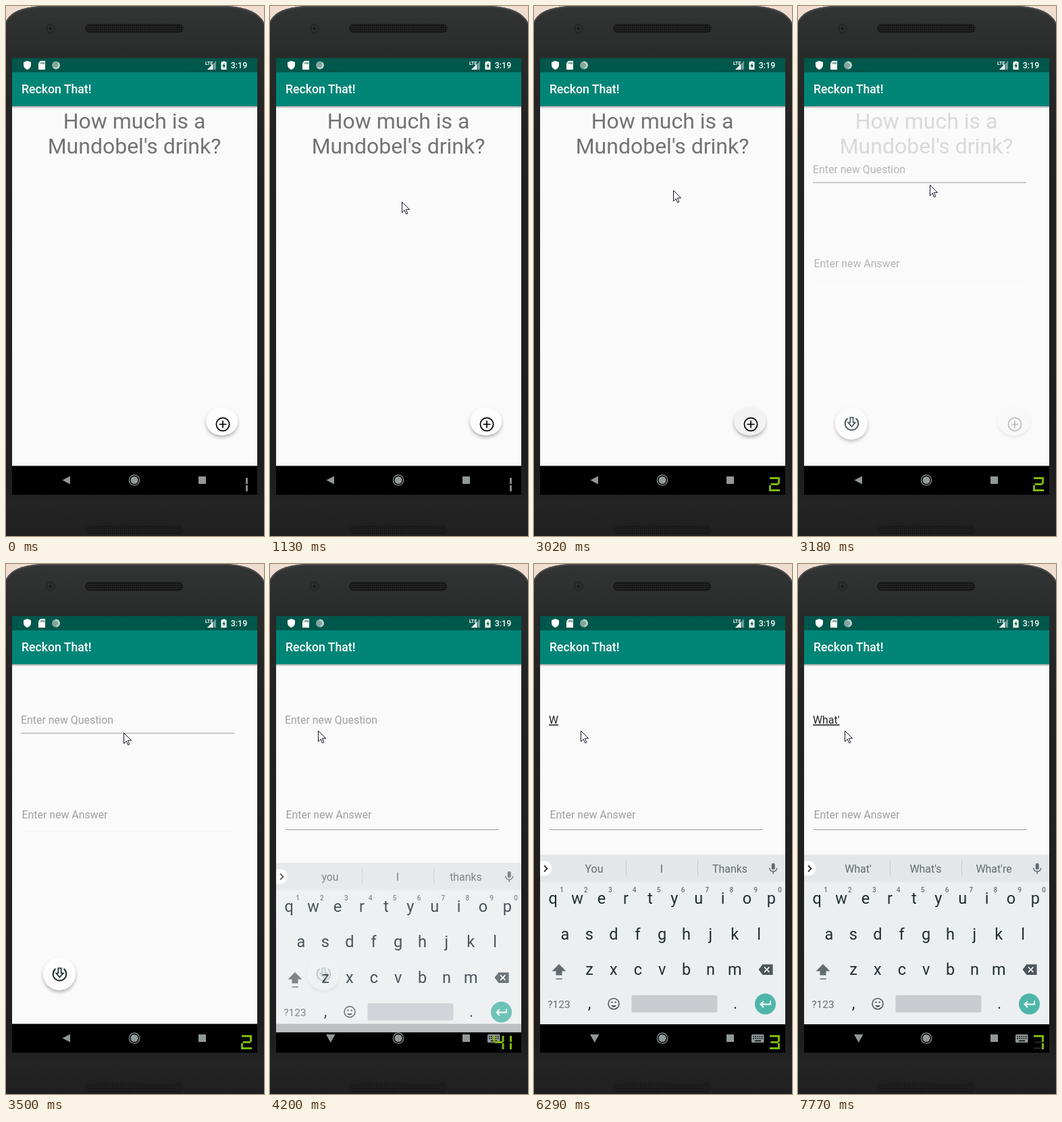
Recreate the animation shown at these times as an HTML page. Size 382 px wide and 783 px high, loop 8000 ms.

```html
<!DOCTYPE html>
<html lang="en">
<head>
<meta charset="utf-8">
<title>Phone quiz demo</title>
<style>
html, body { margin: 0; width: 100%; height: 100%; overflow: hidden; background: #f1ddd0; }
svg { display: block; width: 100%; height: 100%; }
text { font-family: Roboto, sans-serif; white-space: pre; }
.mid { text-anchor: middle; }
.title { font-size: 17.66px; font-weight: 500; fill: #fff; }
.ask { font-size: 32px; fill: #737373; }
.body { font-size: 15.9px; }
.key { font-size: 23.5px; fill: #1f2d33; }
.num { font-size: 10px; font-weight: 500; fill: #667075; }
</style>
</head>
<body>
<svg id="stage" viewBox="0 0 382 783" preserveAspectRatio="none">
  <defs>
    <linearGradient id="shell" x1="0" y1="0" x2="0" y2="1">
      <stop offset="0" stop-color="#333434"/><stop offset=".1" stop-color="#292a2a"/>
      <stop offset=".25" stop-color="#222222"/><stop offset=".9" stop-color="#1e1e1e"/>
      <stop offset=".94" stop-color="#242424"/><stop offset="1" stop-color="#1f1f1f"/>
    </linearGradient>
    <linearGradient id="drop" x1="0" y1="0" x2="0" y2="1">
      <stop offset="0" stop-color="#000" stop-opacity=".35"/><stop offset="1" stop-color="#000" stop-opacity="0"/>
    </linearGradient>
    <pattern id="mesh" width="3" height="3" patternUnits="userSpaceOnUse">
      <rect width="3" height="3" fill="#272727"/><circle cx="1.5" cy="1.5" r="1.1" fill="#090909"/>
    </pattern>
    <filter id="lift" x="-40%" y="-40%" width="180%" height="190%">
      <feDropShadow dx="0" dy="3" stdDeviation="2.6" flood-opacity=".3"/>
    </filter>
    <clipPath id="screen"><rect x="9" y="77" width="363" height="645"/></clipPath>
  </defs>

  <rect width="382" height="783" fill="#f1ddd0"/>
  <path d="M0 783V23C7 9 22 2 52 0H328C356 2 374 9 382 25V783Z" fill="url(#shell)"/>
  <path d="M0 24C7 10 22 3 52 1H328C356 3 374 10 382 26" fill="none" stroke="#484a4a" stroke-width="2"/>
  <rect x="117.500" y="27" width="144.500" height="12.500" rx="6" fill="url(#mesh)" stroke="#1b1b1b"/>
  <rect x="117.500" y="767" width="144.500" height="12.500" rx="6" fill="url(#mesh)" stroke="#1b1b1b"/>
  <circle cx="66" cy="33" r="7.500" fill="#262727"/>
  <circle cx="66" cy="33" r="4.500" fill="#303232"/>
  <circle cx="66" cy="33" r="2.200" fill="#1a1b1b"/>

  <g clip-path="url(#screen)">
    <rect x="9" y="77" width="363" height="645" fill="#fafafa"/>
    <g id="home">
      <text class="ask mid" x="190" y="181">How much is a</text>
      <text class="ask mid" x="190" y="218">Mundobel's drink?</text>
      <ellipse id="addFab" cx="319.700" cy="613.500" rx="23.500" ry="20.700" filter="url(#lift)"/>
      <g fill="none" stroke="#000" stroke-width="1.700">
        <circle cx="321" cy="618" r="9.600"/><path d="M315.500 618H326.500M321 612.500V623.500"/>
      </g>
    </g>

    <g id="form">
      <rect x="9" y="147" width="363" height="600" fill="#fafafa"/>
      <path d="M22 248.500H338M23.500 395.500H338" stroke="#f5f5f5"/>
      <path id="askLine" d="M22 250H338" stroke="#9b9b9b" stroke-width="1.200"/>
      <path id="replyLine" d="M23.500 392.500H338.500" stroke="#9b9b9b" stroke-width="1.200"/>
      <text id="entry" class="body" x="22" y="236"></text>
      <text class="body" x="23.500" y="375.500" fill="#a0a0a0">Enter new Answer</text>
      <circle cx="79" cy="605.500" r="24" fill="#fdfdfd" filter="url(#lift)"/>
      <g fill="none" stroke="#1a2b2e" stroke-width="2">
        <path d="M73.500 598A9.800 9.800 0 1 0 85.500 598"/>
        <path d="M77.300 597H81.700V604.500H84.800L79.500 610.500L74.200 604.500H77.300Z" stroke-width="1.700"/>
      </g>
    </g>

    <rect x="9" y="148" width="363" height="3.500" fill="url(#drop)"/>
    <rect x="9" y="77" width="363" height="21" fill="#00574b"/>
    <rect x="9" y="98" width="363" height="50" fill="#008577"/>
    <text class="title" x="23" y="129">Reckon That!</text>

    <g fill="#fff">
      <path d="M31.500 81L37 83V87C37 90.500 34.500 93 31.500 94C28.500 93 26 90.500 26 87V83Z"/>
      <path d="M51 81H58V94H48V84.500Z"/>
      <path d="M52 83V86M54.200 83V86M56.400 83V86" stroke="#00574b"/>
      <circle cx="74" cy="87.500" r="6" fill="#7fa69f"/>
      <circle id="spin" cx="74" cy="87.500" r="4.500" fill="none" stroke="#c3d3cf" stroke-width="2.500" stroke-dasharray="14 14.300"/>
      <text x="295" y="86.500" font-size="7" font-weight="700">LTE</text>
      <path d="M311 81V94H298Z" opacity=".4"/><path d="M306 86V94H298Z"/>
      <path d="M321 81.500H324V82.500H326.500V94H318.500V82.500H321Z"/>
      <path d="M323.300 84L320.300 89H322.200V92.500L325 87.500H323.300Z" fill="#00574b"/>
      <text x="332.800" y="92.300" font-size="12.400" font-weight="500">3:19</text>
    </g>

    <rect x="9" y="679.400" width="363" height="43" fill="#000"/>
    <g fill="#919999">
      <path id="back"/>
      <circle cx="190" cy="700.500" r="7.700" fill="none" stroke="#919999" stroke-width="1.200"/>
      <circle cx="190" cy="700.500" r="5.600"/>
      <rect x="285" y="695" width="11" height="11"/>
      <g id="imeIcon">
        <rect x="322" y="695" width="18.500" height="12" rx="1.500"/>
        <path d="M324 698H339M324 701H339" stroke="#000" stroke-width="1.500" stroke-dasharray="1.700 1.500"/>
        <path d="M327 704.500H336" stroke="#000" stroke-width="1.500"/>
      </g>
    </g>
    <g id="board"></g>
  </g>

  <path id="dim" fill="none" stroke="#1d1e1c" stroke-width="3"/>
  <path id="lit" fill="none" stroke-width="3"/>
  <path id="mouse" d="M.5.500V16.300L4.200 12.700L6.600 18.400L8.800 17.500L6.400 11.700H11.600Z" fill="#fff" stroke="#111425" stroke-width="1"/>
</svg>
<script>
const LOOP = 8000, STEP = 78.8, PHASE = 176;
const $ = id => document.getElementById(id);
const set = (id, attrs) => { for (const k in attrs) $(id).setAttribute(k, attrs[k]); };
const show = (id, on) => set(id, { visibility: on ? 'visible' : 'hidden' });
const clamp = v => Math.max(0, Math.min(1, v));
const easeOut = p => 1 - (1 - p) ** 3;
const last = (list, t) => list.filter(row => row[0] <= t).pop();

function buildBoard() {
  const text = (cls, x, y, s, more = '') => `<text class="${cls}" x="${x}" y="${y}" ${more}>${s}</text>`;
  const row = (keys, x, y) => [...keys].map((c, i) => text('key mid', x + i * 35.9, y, c)).join('');
  const grey = 'fill="#626b70"';
  $('board').innerHTML = `
    <rect x="9" y="430" width="363" height="250" fill="#eceff1"/>
    <rect x="9" y="429.500" width="363" height="40" fill="#e3e7ea"/>
    <path d="M136.500 438V461M242.500 438V461" stroke="#c6cbce"/>
    <path d="M9 439H15.500A10.700 10.700 0 0 1 15.500 460.500H9Z" fill="#fff"/>
    <path d="M15 445.500L19.500 450L15 454.500" fill="none" stroke="#333" stroke-width="1.800"/>
    ${[89, 189, 290].map((x, i) => text('body mid', x, 456, '', `id="hint${i}" ${grey}`)).join('')}
    <rect x="351.700" y="442" width="5" height="9.500" rx="2.500" ${grey}/>
    <path d="M348.700 449A5.500 5.500 0 0 0 359.700 449M354.200 454.500V458" fill="none" stroke="#626b70" stroke-width="1.500"/>
    ${row('qwertyuiop', 28.3, 502)}
    ${[...'1234567890'].map((c, i) => text('num mid', 41 + i * 35.9, 485, c)).join('')}
    ${row('asdfghjkl', 46, 554.5)}${row('zxcvbnm', 82, 607)}
    <path d="M37 591L47.500 601.500H41.500V607.500H32.500V601.500H26.500Z" ${grey}/>
    <path d="M32.500 613H42" stroke="#626b70" stroke-width="1.500"/>
    <path d="M338.500 591.500H353.500V607H338.500L332.500 599.200Z" fill="#4b565b"/>
    <path d="M341 595.500L348.500 603M348.500 595.500L341 603" stroke="#fff" stroke-width="1.700"/>
    ${text('mid', 37, 656, '?123', 'font-size="15.500" ' + grey)}
    ${text('key mid', 82, 657, ',')}${text('key mid', 298, 657, '.')}
    <circle cx="118" cy="649.700" r="8" fill="none" stroke="#4b565b" stroke-width="1.600"/>
    <path d="M114 652A4.300 4.300 0 0 0 122 652Z" fill="#4b565b"/>
    <path d="M114.200 647.500H116.500M119.500 647.500H121.800" stroke="#4b565b" stroke-width="2"/>
    <rect x="144.500" y="637" width="127" height="25.500" rx="3" fill="#c8ccd0"/>
    <circle cx="342.500" cy="650" r="15.500" fill="#4db6a9"/>
    <path d="M350 645.500V650.500H336M340 646L335.500 650.500L340 655" fill="none" stroke="#fff" stroke-width="2"/>`;
}

// Seven-segment paths, a to g, in a 16 by 21 cell.
const SEGMENTS = {
  a: 'M1 1.500h15', b: 'M14.500 1v9', c: 'M14.500 12v9', d: 'M1 19.500h15',
  e: 'M1.500 12v9', f: 'M1.500 1v9', g: 'M2.500 10.500h11.500'
};
const DIGITS = { 1: 'bc', 2: 'abged', 3: 'abgcd', 4: 'fgbc', 7: 'abc' };
const cell = (segs, x) => [...segs]
  .map(s => SEGMENTS[s].replace(/M([\d.]+) ([\d.]+)/, (m, a, b) => `M${+a + x} ${+b + 696}`)).join('');
const number = s => [...s].map((d, i) => {
  const x = d === '1' ? 342 : 348 - (s.length - 1 - i) * 17.5;
  return cell(DIGITS[d], x);
}).join('');

const COUNTER = [[0, '1'], [2310, '2'], [3960, '41'], [4900, '3'], [7380, '7']];
const TYPED = [
  [0, '', 'you', 'I', 'thanks'],
  [6285, 'W', 'You', 'I', 'Thanks'],
  [6365, 'Wh', 'Wh', 'What', 'When'],
  [7065, 'Wha', 'Wha', 'What', "What's"],
  [7375, 'What', 'What', "What's", 'Whatever'],
  [7765, "What'", "What'", "What's", "What're"]
];
const MOUSE = [
  [176, 230, 661], [338, 215, 470], [490, 192, 300], [570, 195, 289],
  [1760, 195, 289], [1838, 300, 460], [1915, 367, 588], [2070, 342, 594], [2146, 323, 596],
  [2540, 323, 596], [2780, 262, 420], [3013, 206, 272], [3486, 174, 249],
  [3880, 74, 246], [4195, 71, 246], [4270, 69, 246]
];

function along(points, t) {
  const i = points.findIndex(p => p[0] > t);
  if (i < 1) return points[i ? points.length - 1 : 0].slice(1);
  const [a, b] = [points[i - 1], points[i]], p = (t - a[0]) / (b[0] - a[0]);
  return [1, 2].map(k => a[k] + (b[k] - a[k]) * p);
}

function draw(t) {
  const held = Math.floor((t - PHASE) / STEP) * STEP + PHASE;

  show('mouse', t >= 180);
  set('mouse', { transform: `translate(${along(MOUSE, held).map(Math.round)})` });

  const grey = Math.round(253 - 11 * clamp((held - 2290) / 400));
  set('addFab', { fill: `rgb(${grey},${grey},${grey})` });
  set('spin', { transform: `rotate(${t < 2310 ? -45 : -100} 74 87.500)` });

  const enter = easeOut(clamp((held - 3020) / 400));
  show('form', enter > 0);
  set('form', { opacity: enter, transform: `translate(0 ${45 * (1 - enter)})` });
  show('home', enter < 1);

  const focused = t >= 3960;
  set('askLine', { opacity: focused ? 0 : 1 });
  set('replyLine', { opacity: focused ? 1 : 0 });

  const [, word, ...hints] = last(TYPED, t);
  $('entry').textContent = word || 'Enter new Question';
  set('entry', { fill: word ? '#242424' : '#a0a0a0', 'text-decoration': word ? 'underline' : 'none' });
  hints.forEach((s, i) => { $('hint' + i).textContent = s; });

  const typing = t >= 4050;
  set('back', { d: typing ? 'M83 695H96.500L89.700 707Z' : 'M83.500 700.500L95 694.500V706.500Z' });
  show('imeIcon', typing);
  const rise = clamp((held - 4190) / 150);
  show('board', t >= 4200);
  set('board', { opacity: 0.8 + 0.2 * rise, transform: `translate(0 ${12.7 * (1 - rise) ** 2})` });

  const count = last(COUNTER, t)[1];
  set('lit', { d: number(count), stroke: count === '1' ? '#858585' : '#7db80a' });
  set('dim', { d: count === '7' ? cell('gd', 348) : '' });
}

buildBoard();
const start = performance.now();
function tick() {
  draw((performance.now() - start) % LOOP);
  requestAnimationFrame(tick);
}
tick();
</script>
</body>
</html>
```
